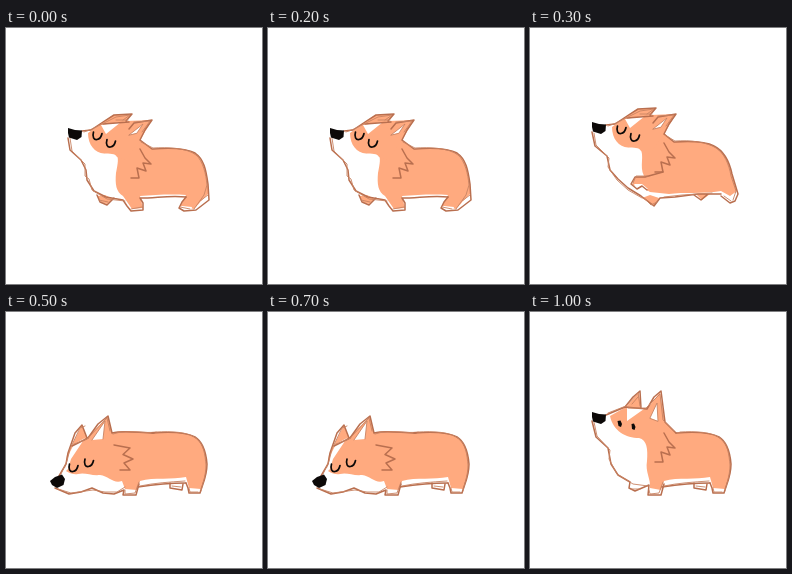
An HTML page that plays this animation: 256 by 256 pixels, repeating every 1100 ms.

```html
<!DOCTYPE html>
<html lang="en">
<head>
<meta charset="utf-8">
<title>Happy corgi</title>
<style>
  html, body { margin: 0; width: 100%; height: 100%; overflow: hidden; background: #fff; }
  svg { display: block; width: 100vw; height: 100vh; }
  path { fill: none; stroke-linecap: round; stroke-linejoin: round; }
  .fur { fill: #ffaa7f; }
  .white { fill: #fff; }
  .line { stroke: #b96f4f; stroke-width: 1.5; }
  .thin { stroke: #c98464; stroke-width: .9; }
  .ink { fill: #0c0908; }
  .lid { stroke: #0c0908; stroke-width: 1.7; }

  .pose { opacity: 0; animation: 1100ms step-end infinite; }
  #walk { animation-name: walk; }
  #leap { animation-name: leap; }
  #stand { animation-name: stand; }
  #bow { animation-name: bow; }
  @keyframes walk {
    0%, 18.1818% { opacity: 1; }
    9.0909%, 27.2727% { opacity: 0; }
  }
  @keyframes leap {
    0%, 18.1818%, 36.3636% { opacity: 0; }
    9.0909%, 27.2727% { opacity: 1; }
  }
  @keyframes stand {
    0%, 45.4545%, 63.6363%, 81.8181% { opacity: 0; }
    36.3636%, 54.5454%, 72.7272%, 90.909% { opacity: 1; }
  }
  @keyframes bow {
    0%, 54.5454%, 72.7272%, 90.909% { opacity: 0; }
    45.4545%, 63.6363%, 81.8181% { opacity: 1; }
  }
</style>
</head>
<body>
<svg viewBox="0 0 256 256">
  <defs>
    <path id="nose" class="ink" d="M62 100 L69 102 L76 102.500 L75.500 109 L71 112 L63 109.500 L62 105Z"/>
    <path id="lid" class="lid" d="M-3.500 -4 C-5 1 -3 4 0 3.500 C3 3 4.500 0 5 -2.500"/>
    <path id="mane" class="line" d="M134 121 L139 130 L145 136 L137 135 L140 143 L131 140 L133 150 L125 150"/>
    <!-- rump and hind legs shared by the two still poses -->
    <g id="rump">
      <path class="line" d="M146 121 C160 120 179 119 189 125 C197 130 200 140 201 152 C201 164 197 171 194 181 L183 181 L182 176 L180 171 M164 171 L164 176 L176 178 L177 172"/>
      <path class="thin" d="M150 120 C165 119 182 120 190 126 C198 132 199 143 200 153 C200 164 196 173 195 179 M183 176 L184 180 L192 180 M166 174 L175 175"/>
      <path class="line" d="M132 175 C145 173 160 171 180 171"/>
      <path class="thin" d="M134 174 C148 171 164 170 179 169"/>
    </g>
    <!-- head with folded ears, shared by the two moving poses -->
    <g id="head">
      <path class="fur" d="M82 105 L97 94 L107 87 L126 86 L120 93 L146 92 L134 112 L120 132 L111 129 C109 125 104 126 98 125.500 C89 125 82 117 82 105Z"/>
      <path class="white" d="M95 97 L115 94 L100 106Z M123 107 L137 96 L131 105Z"/>
      <path class="line" d="M76 103 L85 102 L97 94 L108 87 L126 86 L120 93 M97 96 L123 94 M123 101 L128 95 L146 92 L139 102 L134 112"/>
      <path class="thin" d="M78 104 L86 101 L98 95 L110 89 L124 87 L117 92 M110 92 L122 92 M128 94 L144 93 L136 104 M123 107 L137 96 L131 105Z"/>
      <use href="#nose"/>
      <use href="#lid" x="91" y="108"/>
      <use href="#lid" x="104.500" y="115.500"/>
    </g>
  </defs>

  <g id="walk" class="pose">
    <path class="fur" d="M134 112 L146 121 C160 120 179 119 189 125 C198 131 200 142 202 156 L202 166 L188 181 L174 178 L180 167 C165 166 148 167 134 168 L137 180 L126 181 L117 168 C110 164 109 156 110 145 C112 135 113 130 110 125Z"/>
    <path class="fur" d="M91 168 L95 174 L101 176 L107 171 L99 167Z"/>
    <path class="white" d="M176 178 L186 179 L185 182 L174 181Z M194 174 L201 168 L201 172 L193 178Z"/>
    <path class="line" d="M134 112 L146 121 C160 120 179 119 189 125 C198 131 200 142 202 156 L203 172 L190 182 L178 183 L173 180 L176 174 L180 169"/>
    <path class="thin" d="M135 114 L147 120 C162 119 181 120 190 127 C197 133 200 146 201 157 L198 167 L188 181 M194 173 L202 167 M174 179 L184 181"/>
    <path class="line" d="M62 110 L64 122 L75 132 L80 142 L81 152 L88 163 L100 169 L117 172 L121 178 L125 183 L137 182 L137 175 L134 170 C150 170 165 167 180 169 M91 167 L94 174 L101 177 L108 170"/>
    <path class="thin" d="M64 110 L66 123 L79 136 L79 148 L83 151 L86 162 L101 171 L119 173 M125 181 L136 179 M93 172 L102 174"/>
    <use href="#head"/>
    <use href="#mane"/>
  </g>

  <g id="leap" class="pose">
    <path class="fur" d="M134 105 L144 114 C158 113 175 113 184 118 C194 123 199 132 202 146 L207 163 L200 168 L191 163 C172 166 153 164 139 166 L120 164 L112 159 L102 157 L105 149 L114 148 C109 138 115 128 110 120Z"/>
    <path class="fur" d="M112 170 L124 178 L129 170 L120 167Z M166 166 L172 172 L180 166Z"/>
    <path class="white" d="M104 156 L112 156 L118 161 L107 161Z"/>
    <path class="line" d="M134 106 L144 114 C158 113 175 113 184 118 C194 123 199 132 202 146 L208 166 L205 173 L200 175 L191 168"/>
    <path class="thin" d="M135 107 L145 113 C160 112 177 114 186 120 C194 125 199 136 201 148 L206 163 L203 172 M194 168 L201 173"/>
    <path class="line" d="M62 104 L65 118 L77 128 L80 142 L88 151 L98 160 L111 168 L124 178 L130 170 L145 169 L168 166 L191 166 M117 162 L112 158 L107 161 L101 156 L105 149 L115 149 L133 144 M164 167 L171 172 L178 166"/>
    <path class="thin" d="M64 105 L66 117 L79 130 L78 139 L87 152 L98 162 L112 170 M114 170 L121 177 L127 174 M103 155 L106 148 L118 148 M134 169 L152 167 L182 165"/>
    <use href="#head" y="-6"/>
    <use href="#mane" y="-6"/>
  </g>

  <g id="stand" class="pose">
    <path class="fur" d="M96 95 L109 80 L111 96 L117 97 L130 80 L135 110 L146 121 C160 120 179 119 189 125 C198 131 200 142 201 152 C201 164 198 170 195 177 L183 176 L180 165 C166 168 148 165 134 169 L131 178 L120 176 C121 167 115 160 117 149 C118 137 117 128 109 126 C96 126 83 119 80 104Z"/>
    <path class="white" d="M97 96 L114 97 L97 109Z M120 106 L127 91 L128 109Z"/>
    <path class="line" d="M76 103 L95 95 L103 85 L110 79 L111 96 M95 95 L117 97 L124 85 L131 79 L135 110 L146 121"/>
    <path class="thin" d="M78 101 L96 94 L108 81 L110 94 M98 96 L116 96 L130 82 L133 108 L144 119 M120 106 L127 91 L128 109Z M102 92 L108 85"/>
    <path class="line" d="M62 109 L66 125 L78 136 L81 152 L88 163 L100 170 L99 176 L105 179 L112 176 L119 173 L118 183 L131 183 L134 172"/>
    <path class="thin" d="M64 110 L67 124 L80 138 L79 147 L87 162 L103 172 L118 174 M101 177 L110 177 M119 178 L120 182 L129 181 L133 170"/>
    <use href="#rump"/>
    <use href="#nose"/>
    <path class="ink" d="M87.500 109 L90.500 108.500 L92 112 L91 115 L88.500 114Z M101.500 112 L104 111.500 L105.500 115 L104.500 118 L102 117Z"/>
    <use href="#mane"/>
  </g>

  <g id="bow" class="pose">
    <path class="fur" d="M61 143 L76 113 L81 126 L102 104 L106 121 C120 117 133 121 148 120 C163 120 179 119 189 125 C198 131 200 142 201 152 C201 164 198 170 195 177 L183 176 L180 165 C166 168 148 165 134 169 L131 178 L119 177 L116 169 C107 172 103 164 94 163 C85 164 79 160 72 162 C66 163 61 160 59 158Z"/>
    <path class="white" d="M62 144 L68 132 L79 126 L65 147 L62 157 L58 161Z M86 128 L99 109 L97 127Z"/>
    <path class="line" d="M53 164 L60 152 L62 141 L69 121 L76 113 L81 126 M66 134 L82 126 L92 112 L102 104 L106 121 C118 118 133 121 148 121"/>
    <path class="thin" d="M55 162 L61 149 L64 137 L74 116 L79 114 M68 132 L81 127 L101 106 L104 119 M107 122 C121 117 137 122 150 120 M86 128 L99 109 L97 127"/>
    <path class="line" d="M49 176 L63 182 L75 180 L86 176 L97 181 L108 182 L118 178 L117 183 L130 183 L133 172"/>
    <path class="thin" d="M52 177 L65 181 L87 178 L99 180 L111 180 L119 175 M119 178 L119 182 L129 181 L133 170"/>
    <use href="#rump"/>
    <path class="ink" d="M44 169 L49 165 L56 162.500 L59 167 L57.500 173 L51 176 L46 173Z"/>
    <use href="#lid" x="67" y="156"/>
    <use href="#lid" x="82.500" y="151"/>
    <path class="line" d="M108 133 L124 136 L117 142.500 L127 147 L118 151 L124 158 L114 158"/>
  </g>
</svg>
</body>
</html>
```
